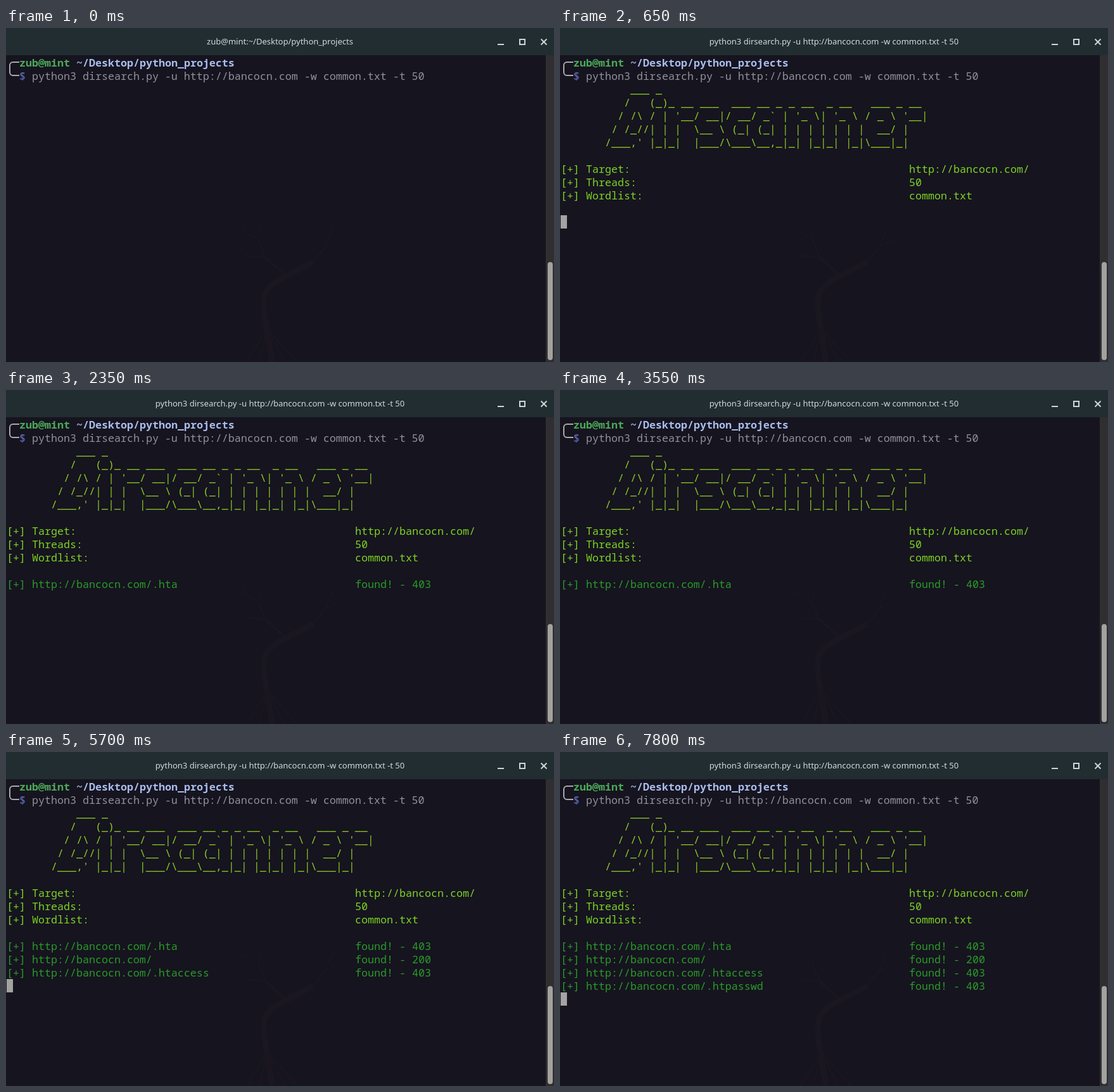
These frames come from a looping animation (865 px wide and 528 px high, 8000 ms). An HTML page with a canvas:

```html
<!DOCTYPE html>
<html lang="en">
<head>
<meta charset="utf-8">
<title>Directory scan</title>
<style>
  html, body { margin: 0; width: 100%; height: 100%; overflow: hidden; background: #16141f; }
  canvas { display: block; }
</style>
</head>
<body>
<canvas id="stage" width="865" height="528"></canvas>
<script>
const ctx = document.getElementById('stage').getContext('2d');
const LOOP = 8000, STEP = 50, BLINK = 604;
const FOCUS = 150, ENTER = 550, OUTPUT = 650;
const CELL = 10, ROW = 21, LEFT = 1, TOP = 44;
const MONO = '16.6667px "Noto Sans Mono", "DejaVu Sans Mono", monospace';
const SANS = '13px "Noto Sans", "Open Sans", sans-serif';
const BACK = '#16141f', TINT = '#1a1721', ICON = '#cdd4d7', GREY = '#92909b';
const BANNER = '#8ccc22', INFO = '#7dd322', FOUND = '#299a29';

const folder = '~/Desktop/python_projects';
const command = 'python3 dirsearch.py -u http://bancocn.com -w common.txt -t 50';
const site = 'http://bancocn.com/';
const banner = String.raw`
           ___ _
          /   (_)_ __ ___  ___ __ _ _ __  _ __   ___ _ __
         / /\ / | '__/ __|/ __/ _${'`'} | '_ \| '_ \ / _ \ '__|
        / /_//| | |  \__ \ (_| (_| | | | | | | |  __/ |
       /___,' |_|_|  |___/\___\__,_|_| |_|_| |_|\___|_|`.split('\n').slice(1);
const info = { 'Target:': site, 'Threads:': '50', 'Wordlist:': 'common.txt' };
const hits = [
  { at: 1550, path: '.hta', code: 403 },
  { at: 4700, path: '', code: 200 },
  { at: 5700, path: '.htaccess', code: 403 },
  { at: 5750, path: '.htpasswd', code: 403 }
];

function randomFrom(seed) {
  return () => (seed = seed * 16807 % 2147483647) / 2147483647;
}

function rect(x, y, w, h, color) {
  ctx.fillStyle = color;
  ctx.fillRect(x, y, w, h);
}

function line(x1, y1, x2, y2, width, color) {
  ctx.beginPath();
  ctx.moveTo(x1, y1);
  ctx.lineTo(x2, y2);
  ctx.lineWidth = width;
  ctx.strokeStyle = color;
  ctx.stroke();
}

function print(col, row, text, color, weight = '') {
  ctx.font = `${weight} ${MONO}`;
  ctx.textAlign = 'left';
  ctx.fillStyle = color;
  ctx.fillText(text, LEFT + col * CELL, TOP + row * ROW + 17);
}

function printPair(row, label, value, color) {
  print(0, row, '[+] ' + label, color);
  print(55, row, value, color);
}

function branch(x, y, angle, length, random) {
  if (length < 10) return;
  const endX = x + Math.cos(angle) * length, endY = y + Math.sin(angle) * length;
  line(x, y, endX, endY, length / 12, TINT);
  for (const side of [-1, 1]) {
    branch(endX, endY, angle + side * (0.3 + random() * 0.4), length * (0.6 + random() * 0.2), random);
  }
}

function drawWallpaper() {
  const random = randomFrom(7);
  ctx.beginPath();
  ctx.moveTo(420, 528);
  ctx.bezierCurveTo(400, 400, 390, 420, 485, 370);
  ctx.lineWidth = 9;
  ctx.strokeStyle = TINT;
  ctx.stroke();
  branch(485, 370, -0.9, 32, random);
  branch(442, 392, -2.4, 44, random);
  for (let x = 380; x <= 460; x += 20) line(412, 475, x, 528, 2, TINT);
  for (let i = 0; i < 60; i++) {
    rect((i % 2 ? 120 : 685) + random() * 40, 200 + random() * 310, 2, 3, TINT);
  }
}

function drawWindow(title) {
  rect(0, 0, 865, 528, BACK);
  drawWallpaper();
  rect(0, 0, 865, 43, '#222d32');
  ctx.font = SANS;
  ctx.textAlign = 'center';
  ctx.fillStyle = '#d2d9dc';
  ctx.fillText(title, 432.5, 26);

  rect(776, 25, 10, 2, ICON);
  line(844.5, 17.5, 853.5, 26.5, 2, ICON);
  line(853.5, 17.5, 844.5, 26.5, 2, ICON);
  ctx.strokeRect(811, 18, 8, 8);

  rect(852, 43, 13, 485, '#302e31');
  ctx.fillStyle = '#a4a29f';
  ctx.beginPath();
  ctx.roundRect(855, 370, 8, 155, 4);
  ctx.fill();
}

function drawPrompt() {
  ctx.beginPath();
  ctx.moveTo(21, 54);
  ctx.arcTo(6, 54, 6, 65, 5);
  ctx.arcTo(6, 75, 21, 75, 5);
  ctx.lineTo(21, 75);
  ctx.lineWidth = 2;
  ctx.strokeStyle = '#aaa8aa';
  ctx.stroke();
  print(2, 0, 'zub@mint', '#4caa58', 'bold');
  print(11, 0, folder, '#a9bdec', 'bold');
  print(2, 1, '$', '#5660a4', 'bold');
  print(4, 1, command, GREY);
}

// The cursor stays solid at the prompt and blinks on the line below the output.
function drawCursor(t, row) {
  const running = t >= ENTER;
  const blinkOn = Math.floor((t - ENTER + 45) / BLINK) % 2 === 0;
  if (running ? !blinkOn : t < FOCUS) return;
  const col = running ? 0 : 4 + command.length;
  rect(LEFT + col * CELL, TOP + row * ROW, CELL, ROW, '#a4a2a2');
}

function draw(t) {
  drawWindow(t < ENTER ? 'zub@mint:' + folder : command);
  drawPrompt();
  let row = t < ENTER ? 1 : 2;
  if (t >= OUTPUT) {
    for (const text of banner) print(0, row++, text, BANNER);
    row++;
    for (const label in info) printPair(row++, label, info[label], INFO);
    row++;
    for (const { at, path, code } of hits) {
      if (t >= at) printPair(row++, site + path, `found! - ${code}`, FOUND);
    }
  }
  drawCursor(t, row);
}

const begin = performance.now();
function tick() {
  const t = (performance.now() - begin) % LOOP;
  draw(Math.floor(t / STEP) * STEP);
  requestAnimationFrame(tick);
}
tick();
</script>
</body>
</html>
```
